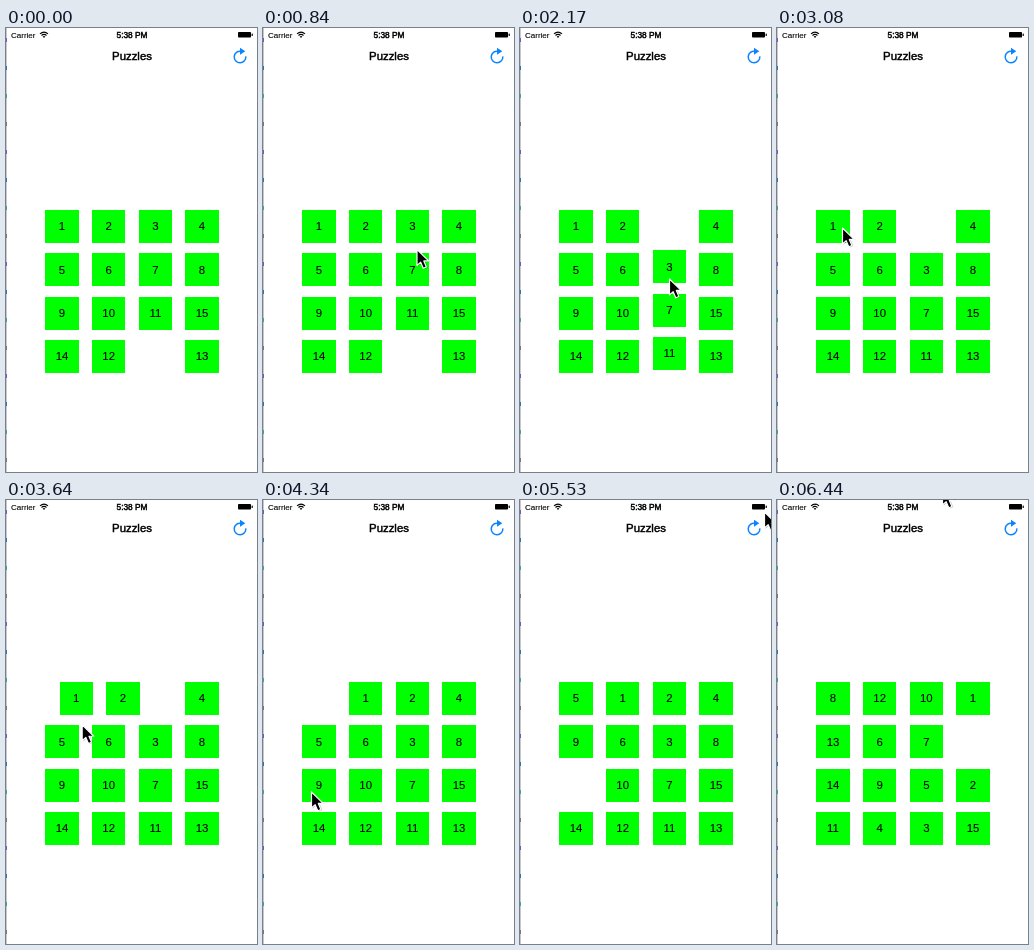
An HTML page that plays this animation: 251 by 444 pixels, repeating every 6580 ms.

```html
<!DOCTYPE html>
<html lang="en">
<head>
<meta charset="utf-8">
<title>Puzzles</title>
<style>
  html, body { margin: 0; width: 100%; height: 100%; overflow: hidden; background: #fff; }
  svg { display: block; width: 100%; height: 100%; }
  text { font-family: "Liberation Sans", Arial, sans-serif; stroke: #000; stroke-width: .1; }
  .mid { text-anchor: middle; }
  .medium { stroke-width: .45; }
  .tile text { font-size: 11.4px; text-anchor: middle; }
  .tile rect { fill: #0f0; shape-rendering: crispEdges; }
</style>
</head>
<body>
<svg viewBox="0 0 251 444">
  <rect width="251" height="444" fill="#fff"/>
  <g id="edge"><rect width="1" height="444" fill="#c9c9cc"/></g>

  <text x="5" y="9.8" font-size="8">Carrier</text>
  <g fill="none" stroke="#000" stroke-width="1.1">
    <path d="M34 5.9Q38 2.2 42 5.9"/>
    <path d="M35.5 7.5Q38 5.2 40.5 7.5"/>
  </g>
  <path d="M36.7 8.5Q38 7.5 39.3 8.5L38 10Z"/>
  <text class="mid medium" x="126" y="9.8" font-size="8.3">5:38 PM</text>
  <rect x="232" y="4" width="13" height="5.5" rx=".8"/>
  <rect x="245.6" y="5.6" width="1.2" height="2.4" rx=".5"/>

  <text class="mid medium" x="126" y="32" font-size="11.4">Puzzles</text>
  <path d="M235 23.3A5.8 5.8 0 1 0 239.8 28.4" fill="none" stroke="#0a84ff" stroke-width="1.5"/>
  <path d="M234 19.8L239.3 23.2L234 26.7Z" fill="#0a84ff"/>

  <g id="tiles"></g>

  <g id="cursor">
    <g transform="translate(-.5 0) scale(1.08)">
      <path d="M1 1V15.5L4.6 12.3L7 18L10 16.7L7.6 11.2H12Z" opacity=".25"/>
      <path d="M0 0V14.8L3.4 11.7L5.8 17.4L8.7 16.2L6.3 10.6H10.8Z"
            stroke="#fff" stroke-width="1.1" stroke-linejoin="round"/>
    </g>
  </g>
</svg>
<script>
const NS = "http://www.w3.org/2000/svg";
const LOOP = 6580, STEP = 70, SLIDE = 300, SHUFFLE = 6020;
const LEFT = 39.3, TOP = 181.9, PITCH_X = 46.67, PITCH_Y = 43.3;
const WIDTH = 33.4, HEIGHT = 33.2;

const START = [1, 2, 3, 4, 5, 6, 7, 8, 9, 10, 11, 15, 14, 12, 0, 13];
const SHUFFLED = [8, 12, 10, 1, 13, 6, 7, 0, 14, 9, 5, 2, 11, 4, 3, 15];
const MOVES = [
  { at: 1918, tiles: [3, 7, 11], dx: 0, dy: 1 },
  { at: 3530, tiles: [1, 2], dx: 1, dy: 0 },
  { at: 4640, tiles: [5, 9], dx: 0, dy: -1 }
];

// Where the pointer stops or turns, and when it arrives and leaves
const STOPS = [
  { x: 149, y: -24, arrive: 0, leave: 140 },
  { x: 155, y: 240, arrive: 770 },
  { x: 154, y: 203, arrive: 910, leave: 1750 },
  { x: 150, y: 251, arrive: 2170 },
  { x: 146, y: 318, arrive: 2380 },
  { x: 66, y: 200, arrive: 3080 },
  { x: 62, y: 199, arrive: 3220, leave: 3360 },
  { x: 95, y: 257, arrive: 3990 },
  { x: 49, y: 292, arrive: 4340, leave: 4480 },
  { x: 222, y: 166, arrive: 5110 },
  { x: 245, y: 12, arrive: 5390, leave: 5530 },
  { x: 229, y: 27, arrive: 5810, leave: 5950 },
  { x: 166, y: -11, arrive: 6440 }
];

function make(name, attrs, parent) {
  const node = document.createElementNS(NS, name);
  for (const key in attrs) node.setAttribute(key, attrs[key]);
  return parent.appendChild(node);
}

const place = (node, x, y) => node.setAttribute("transform", `translate(${x} ${y})`);
const clamp = p => Math.min(1, Math.max(0, p));
const mix = (a, b, k) => a + (b - a) * k;
const easeInOut = p => p * p * (3 - 2 * p);

function pointerAt(t) {
  const next = STOPS.findIndex(s => s.arrive > t);
  if (next < 0) return STOPS[STOPS.length - 1];
  const from = STOPS[next - 1], to = STOPS[next];
  const leave = from.leave ?? from.arrive;
  const k = clamp((t - leave) / (to.arrive - leave));
  return { x: mix(from.x, to.x, k), y: mix(from.y, to.y, k) };
}

// Sliver of another window along the left edge
function drawEdge() {
  const edge = document.getElementById("edge");
  const inks = ["#75c", "#27c", "#3aa", "#777"];
  for (let i = 0; i < 16; i++) {
    make("rect", { y: 10 + i * 28, width: 1, height: 4, fill: inks[i % inks.length] }, edge);
  }
}

const tiles = [];
for (let n = 1; n <= 15; n++) {
  const g = make("g", { class: "tile" }, document.getElementById("tiles"));
  make("rect", { width: WIDTH, height: HEIGHT }, g);
  make("text", { x: WIDTH / 2, y: 20.4 }, g).textContent = n;
  tiles[n] = g;
}
const cursor = document.getElementById("cursor");

function draw(t) {
  const shuffled = t >= SHUFFLE;
  (shuffled ? SHUFFLED : START).forEach((n, i) => {
    if (!n) return;
    let col = i % 4, row = Math.floor(i / 4);
    const move = !shuffled && MOVES.find(m => m.tiles.includes(n));
    if (move) {
      const p = easeInOut(clamp((t - move.at) / SLIDE));
      col += move.dx * p;
      row += move.dy * p;
    }
    place(tiles[n], LEFT + col * PITCH_X, TOP + row * PITCH_Y);
  });
  const { x, y } = pointerAt(t);
  place(cursor, x, y);
}

const begin = performance.now();
function tick() {
  const t = (performance.now() - begin) % LOOP;
  draw(Math.floor(t / STEP) * STEP);
  requestAnimationFrame(tick);
}
drawEdge();
draw(0);
requestAnimationFrame(tick);
</script>
</body>
</html>
```
